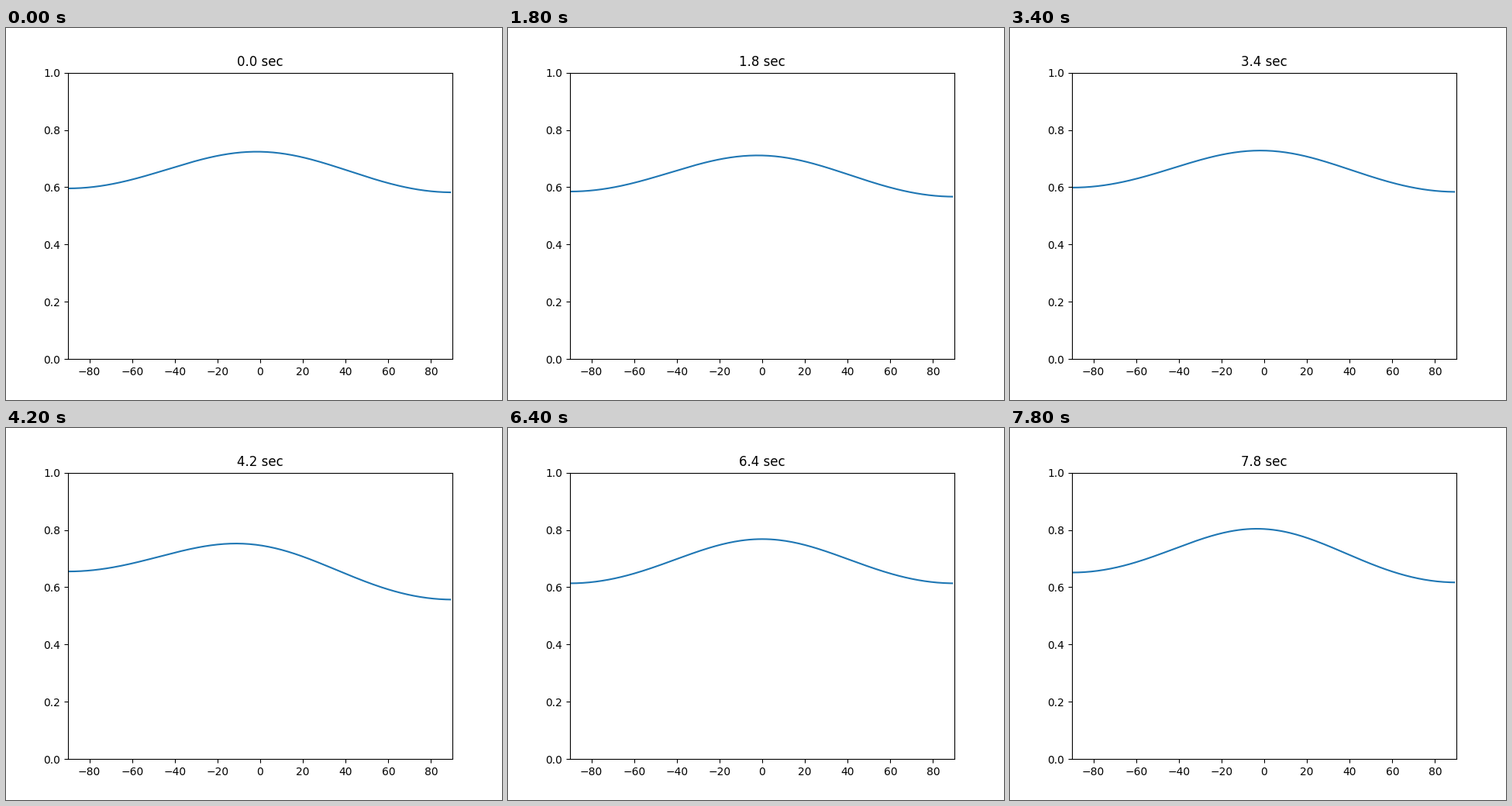
These frames come from a looping animation (640x480 px, 8000 ms). A matplotlib script:

```python
import numpy as np
import matplotlib.pyplot as plt
from matplotlib.animation import FuncAnimation

STEP = 0.2      # seconds per frame
FRAMES = 40

# Key moments: seconds, crest height, lean (sine of the crest's angle)
KEYS = [(0, 0.724, -0.028), (1, 0.7285, 0.35), (1.8, 0.711, -0.037),
        (3.4, 0.728, -0.031), (5, 0.777, -0.137), (6.4, 0.768, 0),
        (7.8, 0.804, -0.061)]
times, crests, leans = np.array(KEYS).T

angles = np.arange(-90, 90)
sines = np.sin(np.radians(angles))


def lean_at(t):
    """Blend between keys, swaying left by more over longer gaps."""
    i = np.clip(np.searchsorted(times, t, side="right"), 1, len(times) - 1)
    gap = times[i] - times[i - 1]
    u = (t - times[i - 1]) / gap
    return np.interp(t, times, leans) - 0.07 * gap * np.sin(np.pi * u) ** 2


def response(t):
    crest = np.interp(t, times, crests)
    lean = lean_at(t)
    # Higher crests fall off further; the bell narrows slowly with time
    drop = (0.135 + 0.44 * max(crest - 0.724, 0)) * (1 - 0.56 * lean ** 2)
    width = 1 + 0.05 * t
    bell = (1 - np.cos(width * (sines - lean))) / (1 - np.cos(width))
    return crest - drop * bell


fig, ax = plt.subplots(figsize=(6.4, 4.8), dpi=100)
ax.set_xlim(-90, 90)
ax.set_ylim(0, 1)
line, = ax.plot(angles, response(0), color="C0")
title = ax.set_title("0.0 sec")


def update(frame):
    t = round(frame * STEP, 1)
    line.set_ydata(response(t))
    title.set_text(f"{t:.1f} sec")
    return line, title


anim = FuncAnimation(fig, update, frames=FRAMES, interval=STEP * 1000,
                     repeat=True, repeat_delay=0)
plt.show()
```
